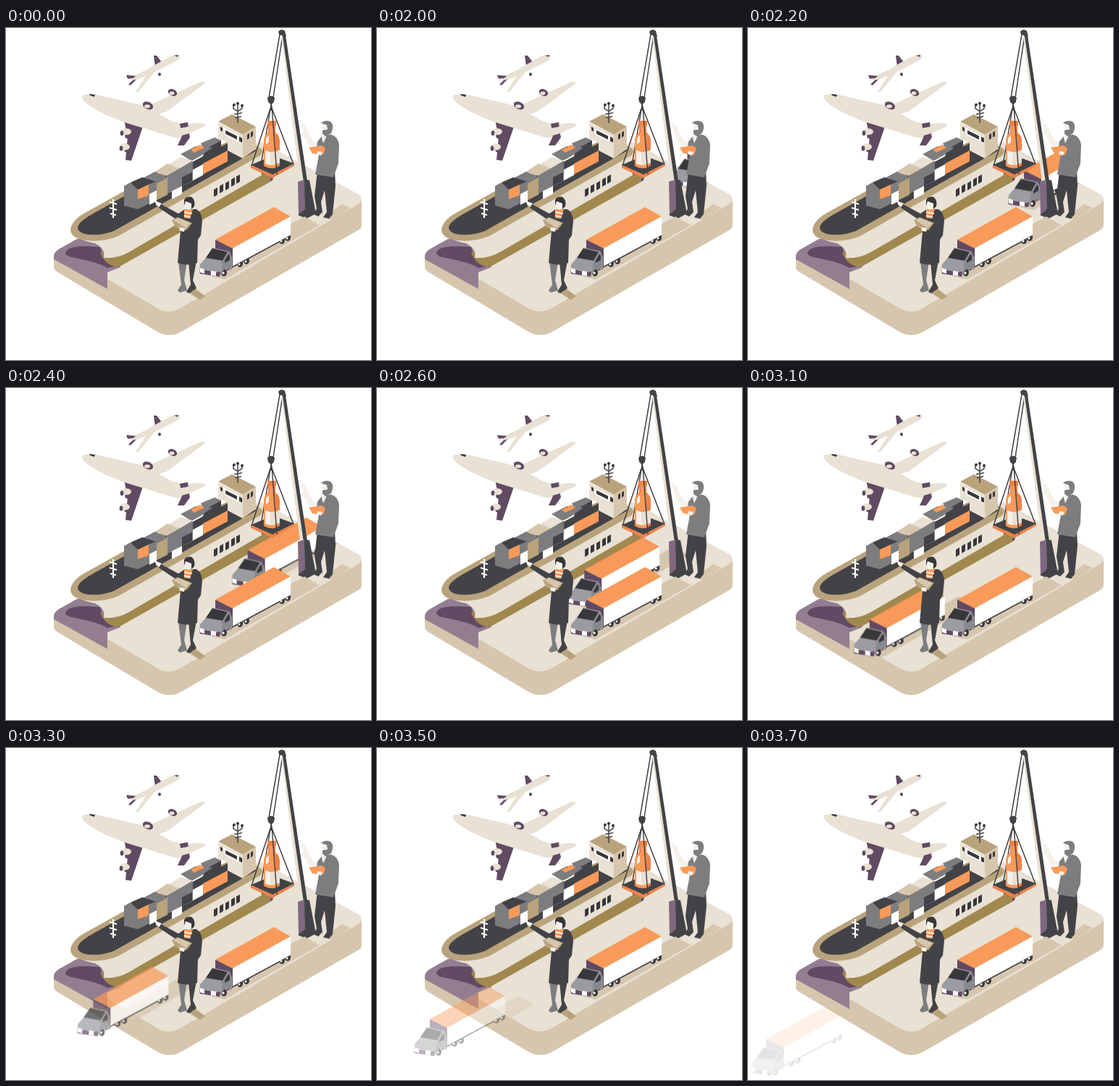
An HTML page that plays this animation: 504x458 px, repeating every 3.8 s.

```html
<!DOCTYPE html>
<html lang="en">
<head>
<meta charset="utf-8">
<title>Freight harbour</title>
<style>
  html, body { margin: 0; width: 100%; height: 100%; overflow: hidden; background: #fff; }
  svg { display: block; width: 504px; height: 458px; }
  .cream { fill: #e8e1d4 } .sand { fill: #d6c6ad } .tan { fill: #b9a37c } .olive { fill: #a1884f }
  .dark { fill: #434347 } .ink { fill: #38383b } .grey { fill: #7d7d80 } .silver { fill: #9b9ca0 }
  .plum { fill: #614a63 } .mauve { fill: #937e91 } .orange { fill: #f89a59 } .rust { fill: #ee8145 }
  .white { fill: #fff } .skin { fill: #f5f1e9 }
  .line { fill: none; stroke: #434347; stroke-width: 1.5 }
  .go { animation: drive 3.8s infinite, fade 3.8s infinite; }
  /* 18 hops of 100 ms after a two second rest */
  @keyframes drive {
    0%, 52.63% { transform: translate(139.4px, -123px); animation-timing-function: steps(18, end); }
    100% { transform: translate(-287.2px, 123px); }
  }
  @keyframes fade {
    0% { opacity: 0; animation-timing-function: step-end; }
    52.63% { opacity: 1; animation-timing-function: step-end; }
    81.575% { opacity: 1; animation-timing-function: steps(7, end); }
    100% { opacity: 0; }
  }
</style>
</head>
<body>
<svg viewBox="0 0 504 458">
  <defs>
    <path id="top" d="M140 320L350 156L486 229Q496 236 486 243L242 386Q225 396 208 386L140 346Z"/>
    <clipPath id="ground"><use href="#top"/></clipPath>
    <clipPath id="gate"><path d="M0 0H450V458H0Z"/></clipPath>
    <path id="shadow" class="sand" d="M284 343L302 347L433 272L412 260L392 271L310 320Z"/>
    <g id="truck">
      <g class="ink">
        <ellipse cx="301" cy="337" rx="4" ry="5.5"/>
        <ellipse cx="323" cy="325" rx="4" ry="5"/>
        <ellipse cx="332" cy="321" rx="4" ry="5"/>
        <ellipse cx="381" cy="293" rx="4" ry="5"/>
        <ellipse cx="389" cy="289" rx="4" ry="5"/>
      </g>
      <path class="orange" d="M289 292L370 247L393 260L313 304Z"/>
      <path class="white" d="M313 304L393 260V286L313 329Z"/>
      <path class="line" d="M313 329.5L393 286.5" stroke-width=".8"/>
      <path class="plum" d="M289 292L313 304V331L306 335L289 305Z"/>
      <path class="silver" d="M268 326L276 317L285 303L308 308L312 316V334L305 332Q299 332 296 342L267 338Z"/>
      <path fill="#88898d" d="M299 322L307 309L311 314V333L305 331Q299 332 297 340Z"/>
      <path class="ink" d="M276 317L285 304L306 309L299 321Z"/>
      <path class="ink" d="M302 321L307 312L309 314V320L302 324Z"/>
      <path class="plum" d="M268 333L291 337L296 336L295 343L268 339Z"/>
      <path class="white" d="M268 331L274 333V339L268 337ZM283 335L290 336V342L283 341Z"/>
      <g fill="#fff">
        <circle cx="300" cy="338" r="1.7"/><circle cx="322" cy="326" r="1.5"/><circle cx="331" cy="322" r="1.5"/>
        <circle cx="380" cy="294" r="1.5"/><circle cx="388" cy="290" r="1.5"/>
      </g>
    </g>
    <path id="port" class="ink" d="M0 3L5 0V10L0 13Z"/>
  </defs>

  <!-- ground -->
  <path class="sand" d="M66 313L140 340L225 380L491 236V272Q491 276 486 279L242 419Q226 428 209 419L70 336Q66 333 66 330Z"/>
  <use href="#top" class="cream"/>
  <path class="mauve" d="M66 316Q66 309 73 305L98 291L150 285L158 330L140 337V360L66 319Z"/>
  <path class="plum" d="M82 311C84 299 108 301 130 302L134 317L150 329L140 331C128 323 104 319 90 316Q83 314 82 311Z"/>
  <path class="plum" d="M340 203L372 196L368 210L352 219Z"/>
  <path class="mauve" d="M354 204L371 204L356 215Z"/>

  <!-- ship -->
  <path class="olive" d="M130 310Q139 331 157 329L365 212V196L160 305Z"/>
  <path class="cream" d="M90 281Q99 290 130 291L353 167V203L170 309Q152 319 135 317Q138 305 123 297Q98 292 90 281Z"/>
  <path class="tan" d="M89 278Q91 265 109 255L165 224L320 150L352 166Q356 170 351 176L155 287Q127 298 101 291Q89 287 89 278Z"/>
  <path class="dark" d="M99 275Q100 268 115 259L165 231L318 153L346 169L149 280Q128 288 108 284Q99 281 99 275Z"/>
  <use href="#port" x="287" y="220"/><use href="#port" x="295" y="215"/><use href="#port" x="303" y="211"/>
  <use href="#port" x="311" y="206"/><use href="#port" x="318" y="202"/>
  <path d="M148 236V262M143 240L153 243M143 248L153 251M144 256L152 258" fill="none" stroke="#fff" stroke-width="2.2"/>

  <!-- bridge -->
  <path class="cream" d="M293 130L327 147V180L306 169V158L293 152Z"/>
  <path class="sand" d="M327 147L345 136V167L327 180Z"/>
  <path class="tan" d="M293 129L312 119L345 136L327 147Z"/>
  <path class="white" d="M301 138L321 148V157L301 147Z"/>
  <path class="ink" d="M303 141L319 149V154L303 146ZM296 136L299 138V143L296 141ZM322 150L326 152V158L322 156ZM333 147L336 145V152L333 154ZM338 144L341 142V149L338 151Z"/>
  <path class="line" d="M320 131V104M314 105V111L320 115L326 111V106M315 119L326 117M316 124L325 122"/>
  <g class="ink"><circle cx="315" cy="106" r="2"/><circle cx="320" cy="104" r="2"/><circle cx="326" cy="107" r="2"/></g>

  <!-- containers -->
  <path class="grey" d="M269 159L288 151L297 155L273 168Z"/>
  <path class="dark" d="M273 168L297 155V172L273 184Z"/>
  <path class="grey" d="M241 174L262 163L285 165L257 184Z"/>
  <path class="orange" d="M255 168L268 161L274 165L260 172Z"/>
  <path class="orange" d="M272 187L306 169V184L272 202Z"/>
  <path class="white" d="M257 183L272 175V203L257 211Z"/>
  <path class="dark" d="M257 185L272 177V188L257 196Z"/>
  <path class="cream" d="M222 190L241 178L258 183L240 194Z"/>
  <path class="grey" d="M240 194L258 184V211L240 220Z"/>
  <path class="dark" d="M243 206L257 199V211L243 218Z"/>
  <path class="sand" d="M206 198L223 187L240 194L222 204Z"/>
  <path class="grey" d="M222 204L240 194V220L222 229Z"/>
  <path class="white" d="M229 225L243 218V229L229 236Z"/>
  <path class="grey" d="M189 207L206 198L223 206L207 215Z"/>
  <path class="tan" d="M207 215L223 206V230L207 238Z"/>
  <path class="dark" d="M172 213L188 206L208 212L181 227Z"/>
  <path class="grey" d="M163 218L172 213L182 223V250L163 245Z"/>
  <path class="grey" d="M182 223L208 211V237L182 250Z"/>
  <path class="orange" d="M182 223L197 216V231L182 236Z"/>
  <path class="white" d="M198 229L208 224V239L198 244Z"/>

  <!-- large aircraft -->
  <path class="cream" d="M188 111L267 75Q275 72 274 77L222 115L205 121Z"/>
  <path class="plum" d="M163 127L189 136L187 142L173 183L165 182L168 150Z"/>
  <path class="cream" d="M105 94Q108 90 125 92L190 107L228 128L245 133L267 131Q276 131 275 135L252 146Q246 154 232 151L163 130Q120 114 107 100Q104 97 105 94Z"/>
  <path class="plum" d="M240 132L251 130L252 141L254 151L246 162L237 162L243 149Z"/>
  <path class="cream" d="M236 139L274 132L275 135L251 146L240 149Z"/>
  <path class="ink" d="M115 91L123 92L122 95L116 93Z"/>
  <g class="plum">
    <ellipse cx="196" cy="107" rx="7.5" ry="5" transform="rotate(25 196 107)"/>
    <ellipse cx="230" cy="89" rx="6.5" ry="4.5" transform="rotate(25 230 89)"/>
    <ellipse cx="169" cy="149" rx="5" ry="4"/><ellipse cx="168" cy="168" rx="5" ry="4"/>
  </g>
  <g class="cream">
    <ellipse cx="195" cy="108" rx="4" ry="2.6"/><ellipse cx="229" cy="90" rx="3.4" ry="2.4"/>
    <ellipse cx="166" cy="143" rx="7" ry="4.5"/><ellipse cx="164" cy="164" rx="7" ry="4.5"/>
  </g>
  <g class="plum"><ellipse cx="160" cy="145" rx="2.4" ry="3.6"/><ellipse cx="159" cy="166" rx="2.4" ry="3.6"/></g>

  <!-- small aircraft -->
  <path class="plum" d="M204 38L208 38L215 47L206 53Z"/>
  <path class="cream" d="M240 37Q242 41 236 45L205 61L183 88L179 88L193 66L177 73L168 70L195 57L223 41Q234 36 240 37Z"/>
  <path class="plum" d="M166 65L179 66L176 69L168 70ZM175 72L180 71L172 79L169 78Z"/>
  <g class="plum"><ellipse cx="212" cy="64" rx="2" ry="2.4"/><path d="M232 38L238 37L237 40Z"/></g>

  <!-- second lorry -->
  <g clip-path="url(#ground)"><use href="#shadow" class="go"/></g>
  <g clip-path="url(#gate)"><use href="#truck" class="go"/></g>

  <!-- crane and load -->
  <path class="rust" d="M338 189L368 202L398 187V190L368 207L338 193Z"/>
  <path class="dark" d="M338 189L368 176L398 187L368 202Z"/>
  <path class="line" d="M365 112L353 183"/>
  <path class="rust" d="M362 130H372V144Q378 148 378 156V190Q367 197 356 190V156Q356 148 362 144Z"/>
  <path class="orange" d="M364 132H369V146Q373 150 372 158V193Q362 194 356 190V156Q356 148 364 144Z"/>
  <path class="cream" d="M358 169Q367 174 378 168V186Q367 192 358 187Z"/>
  <path class="skin" d="M358 169L365 171V189L358 187Z"/>
  <path class="rust" d="M361 128H373V135H361Z"/>
  <path class="skin" d="M359 153Q360 150 363 148V157L359 161Z"/>
  <path class="line" d="M366 108L339 190M366 108L397 188M367 108L374 202"/>
  <path class="line" d="M378 9L363 96M382 10L369 96"/>
  <path class="dark" d="M361 96Q366 91 371 96L370 102L367 105V114H365V105L362 102Z"/>
  <path class="cream" d="M380 12L384 10L413 211L406 211Z"/>
  <path class="dark" d="M382 11L386 10L416 211L411 213Z"/>
  <path class="dark" d="M376 5Q380 0 385 4L387 12L377 9Z"/>
  <path fill="#7f6880" d="M403 212L413 209L416 262L404 257Z"/>
  <path class="dark" d="M412 209L419 210L428 256L415 263L403 258L413 250Z"/>

  <!-- man -->
  <path class="sand" d="M438 262L464 243L475 248L450 265Z"/>
  <path class="dark" d="M430 197L454 195L455 218L451 257L446 263L438 261L443 254L440 224L435 240L437 254L431 260L425 257L429 249L426 232Z"/>
  <path class="skin" d="M407 131L413 134L417 143L425 157L435 153L435 162L421 166L411 149Z"/>
  <path class="grey" d="M436 149L449 147Q459 150 460 162L459 187L452 206L427 202L432 175L428 173L430 157Z"/>
  <path class="skin" d="M435 148L444 147L438 159Z"/>
  <path class="orange" d="M418 165L436 162L441 166L438 175L423 173Z"/>
  <path class="skin" d="M430 170L437 171L435 176L429 174Z"/>
  <path class="skin" d="M436 130L446 130L445 145L438 147Z"/>
  <path class="grey" d="M435 131Q440 126 448 129Q454 134 449 145L442 150L437 146L437 141L444 140L443 134Z"/>

  <!-- parked lorry -->
  <use href="#shadow"/>
  <use href="#truck"/>

  <!-- woman -->
  <path class="tan" d="M249 363L262 360L275 370L268 375Z"/>
  <path class="grey" d="M238 322L250 322L246 348L250 362L240 365L237 362L242 354Z"/>
  <path class="dark" d="M252 322L263 321L258 348L263 359L253 366L249 364L255 354Z"/>
  <path class="skin" d="M205 238L215 242L213 247L208 245Z"/>
  <path class="dark" d="M214 243L238 256L247 250L263 250Q270 254 271 266L269 286L265 292L264 324Q250 329 237 324L241 280L238 266L211 248Z"/>
  <path class="orange" d="M246 250L258 250L254 263L246 262Z"/>
  <path d="M246 254L257 256M246 259L255 261" stroke="#fff" stroke-width="1.5"/>
  <path class="tan" d="M229 265L237 261L257 269L249 279L234 275Z"/>
  <path class="sand" d="M231 265L238 262L255 269L248 276Z"/>
  <path class="skin" d="M239 275L247 276L246 281L240 280Z"/>
  <path class="skin" d="M247 238L257 238L257 247L252 251L247 248Z"/>
  <path class="ink" d="M246 237Q249 232 256 233Q262 237 260 246L256 250L256 242L248 239L246 245Z"/>
</svg>
</body>
</html>
```
